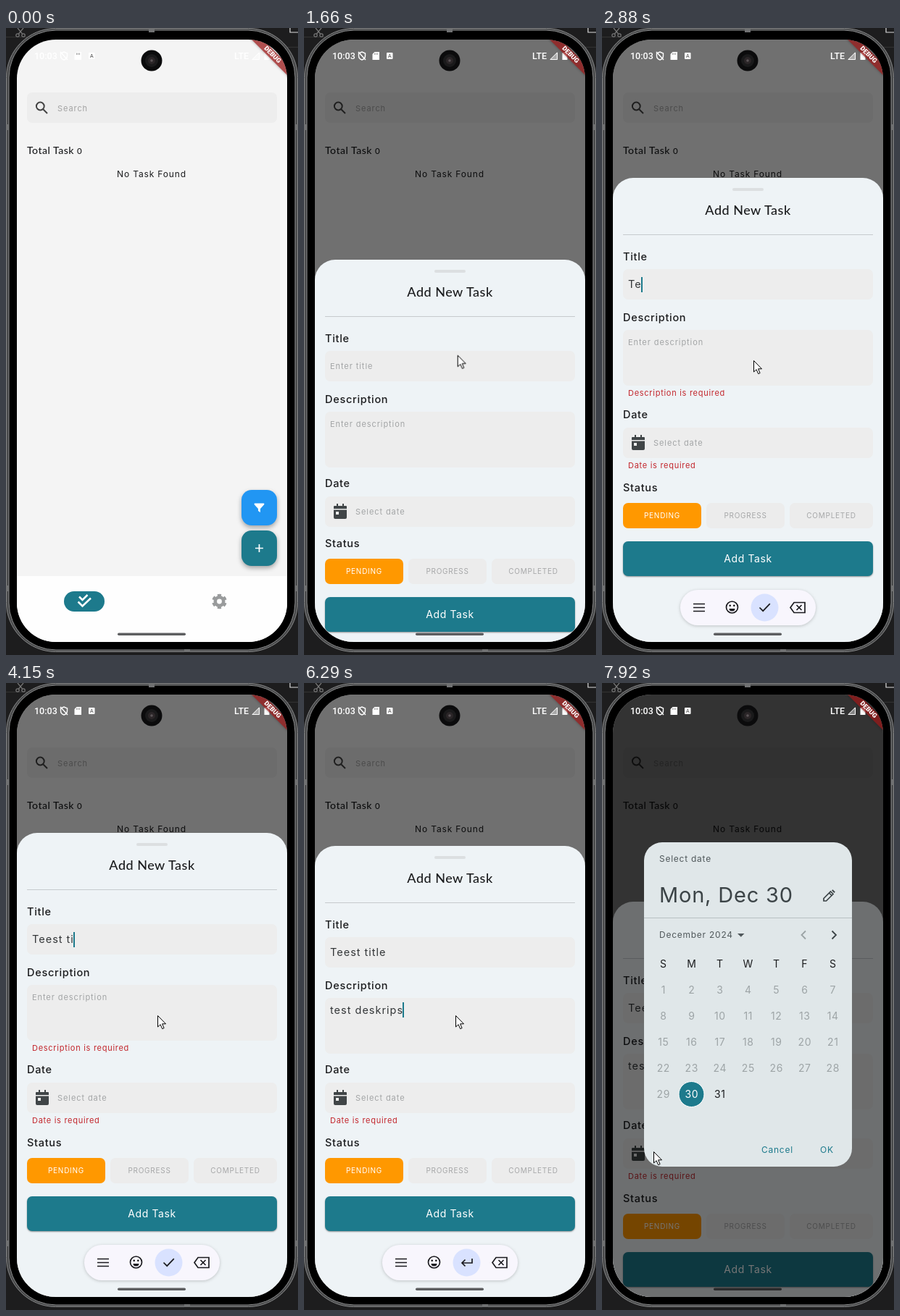
Recreate the animation shown at these times as an HTML page. Size 403 by 866 pixels, loop 7.99 s.

```html
<!DOCTYPE html>
<html lang="en">
<head>
<meta charset="utf-8">
<title>Add a task</title>
<style>
  :root { --teal: #1d7a8c; --loop: 7990ms infinite step-end; }
  html, body { margin: 0; width: 100%; height: 100%; overflow: hidden; background: #1d1d1e; }
  body { font-family: Inter, "Noto Sans", sans-serif; color: #1b1c1e; }
  .stage { position: absolute; left: 0; top: 0; width: 403px; height: 866px; overflow: hidden; }
  .layer { position: absolute; inset: 0; width: 403px; height: 866px; }
  .screen { clip-path: inset(16px 15px 18px 15px round 54px); background: #f4f4f4; }
  p, h1 { margin: 0; font-weight: 400; }
  .hint, .hintfill { font-size: 11px; letter-spacing: .92px; }
  .hint { color: #a3a5a6; }
  .hintfill { fill: #a3a3a3; }
  .head { font-family: Lato, "Open Sans", sans-serif; font-weight: 500; }
  .system { font-family: Roboto, sans-serif; }
  .line { fill: none; stroke: #1b1b1f; stroke-width: 1.7; }

  .scrim { background: #000; opacity: 0; animation: dim var(--loop); }
  .scrim.top { animation-name: dimTop; }
  @keyframes dim {
    0% { opacity: 0 } 11.13% { opacity: .26 } 12.01% { opacity: .44 }
    12.89% { opacity: .52 } 13.76%, 100% { opacity: .54 }
  }
  @keyframes dimTop { 0% { opacity: 0 } 98.24% { opacity: .3 } 99.12%, 100% { opacity: .54 } }

  .sheet {
    position: absolute; left: 15px; bottom: -59px; width: 373px; box-sizing: border-box;
    padding: 0 14px 91px; border-radius: 28px 28px 0 0; background: #eef3f6;
    display: flex; flex-direction: column; translate: 0 620px; animation: sheet var(--loop);
  }
  @keyframes sheet {
    0% { translate: 0 620px } 11.13% { translate: 0 240px } 12.01% { translate: 0 72px }
    12.89% { translate: 0 14px } 13.76% { translate: 0 0 }
    25.03% { translate: 0 -3px } 25.9% { translate: 0 -10px } 26.65% { translate: 0 -24px }
    27.53% { translate: 0 -42px } 28.28% { translate: 0 -57px } 29.16% { translate: 0 -70px }
    30.03% { translate: 0 -77px } 81.22% { translate: 0 -52px } 82.1% { translate: 0 -14px }
    82.97%, 100% { translate: 0 0 }
  }
  .top-bar { height: 78px; border-bottom: 1px solid #c6cacd; position: relative; text-align: center; }
  .top-bar::before {
    content: ""; position: absolute; left: 151px; top: 14px; width: 43px; height: 4px;
    border-radius: 2px; background: #dcdfe1;
  }
  .top-bar h1 { font-size: 18px; letter-spacing: .5px; line-height: 24px; padding-top: 32px; font-weight: 500; }
  .label { font-size: 14.5px; font-weight: 500; letter-spacing: .7px; line-height: 22px; }
  .field {
    position: relative; height: 42px; box-sizing: border-box; padding: 0 7px; border-radius: 7px;
    background: #ededed; display: flex; align-items: center; line-height: 22px;
  }
  .field.area { height: 77px; align-items: flex-start; padding-top: 6px; }
  .field .hint { position: absolute; }
  .value { font-size: 14.5px; letter-spacing: 1px; white-space: pre; color: #333638; }
  .caret { width: 2px; height: 21px; margin-left: -1px; background: var(--teal); }
  .error { height: 18px; line-height: 20px; padding-left: 7px; font-size: 11px; letter-spacing: .72px; color: #c3272d; }
  .chips { display: grid; grid-template-columns: 108px 108px 1fr; gap: 7px; text-align: center; }
  .chips span {
    height: 35px; line-height: 35px; border-radius: 7px; background: #ececec; color: #a6a7a8;
    font-size: 10px; letter-spacing: .75px;
  }
  .chips .on { background: #ff9800; color: #fff; }
  .add {
    margin-top: 18px; height: 48px; line-height: 48px; border-radius: 7px; background: var(--teal);
    color: #fff; text-align: center; font-size: 14px; letter-spacing: .6px; box-shadow: 0 1px 2px #0006;
  }

  .keys { translate: 0 100px; animation: keys var(--loop); filter: drop-shadow(0 1px 2px #0003); }
  .keys g { animation: fadeKeys var(--loop); }
  @keyframes keys {
    0% { translate: 0 100px } 25.9% { translate: 0 60px } 26.65% { translate: 0 24px }
    27.53% { translate: 0 5px } 28.28% { translate: 0 -2px } 29.16% { translate: 0 -1px }
    30.03% { translate: 0 0 } 81.22% { translate: 0 30px } 82.1% { translate: 0 70px }
    82.97%, 100% { translate: 0 100px }
  }
  @keyframes fadeKeys { 0% { opacity: 1 } 80.35%, 100% { opacity: .3 } }

  .dialog { opacity: 0; animation: dialog var(--loop); font-size: 12px; letter-spacing: .75px; }
  @keyframes dialog { 0% { opacity: 0 } 98.24% { opacity: .45 } 99.12%, 100% { opacity: 1 } }
  .days { font-size: 14px; letter-spacing: .6px; text-anchor: middle; }

  .banner {
    position: absolute; left: 352px; top: 10px; width: 73px; height: 11px; transform-origin: 36px 6px;
    transform: translate(-21px, 21px) rotate(45deg); text-align: center; color: #fff;
    font-size: 9px; font-weight: 800; line-height: 11px;
    background: linear-gradient(#b71c1ca0 0 0), #0005; box-shadow: 0 0 4px #0005;
  }

  .mouse { position: absolute; left: 0; top: 0; width: 14px; height: 22px; overflow: visible; opacity: 0; animation: mouse var(--loop); }
  @keyframes mouse {
    0% { opacity: 0; translate: 369px 834px }
    1.62% { opacity: 1; translate: 369px 834px; animation-timing-function: steps(4, start) }
    5.13% { opacity: 1; translate: 346px 755px }
    6.75% { opacity: 1; translate: 346px 755px; animation-timing-function: steps(2, start) }
    8.51% { opacity: 1; translate: 352px 721px }
    12.89% { opacity: 1; translate: 352px 721px; animation-timing-function: steps(5, start) }
    17.27% { opacity: 1; translate: 241px 522px; animation-timing-function: steps(4, start) }
    20.77% { opacity: 1; translate: 213px 448px; animation-timing-function: steps(3, start) }
    23.4% { opacity: 1; translate: 209px 459px }
    88.73% { opacity: 1; translate: 209px 459px; animation-timing-function: steps(6, start) }
    93.99% { opacity: 1; translate: 50px 632px; animation-timing-function: steps(3, start) }
    96.62%, 100% { opacity: 1; translate: 71px 647px }
  }
  [hidden] { display: none !important; }
</style>
</head>
<body>
<div class="stage">
  <!-- phone body -->
  <svg class="layer" viewBox="0 0 403 866">
    <path d="M0 12.500h30M373 26.500h30" stroke="#333"/>
    <g fill="none" stroke="#777" stroke-width="1.200">
      <circle cx="16" cy="10" r="2.200"/><circle cx="24" cy="10" r="2.200"/>
      <path d="M17.500 8L24 0M22.500 8L16 0"/>
      <path d="M392 0v6h11" stroke="#ddd"/>
    </g>
    <rect x=".500" y=".500" width="402" height="861" rx="68" fill="#48494a" stroke="#858687"/>
    <rect x="4" y="3" width="395" height="856" rx="65" fill="#000" stroke="#8a8b8c"/>
    <path d="M0 133h4v8H0zM399 133h4v8h-4zM0 770h4v8H0zM399 770h4v8h-4zM197 0h8v6h-8zM246 858h8v4h-8z" fill="#707172"/>
  </svg>

  <div class="layer screen">
    <!-- task list -->
    <svg class="layer" viewBox="0 0 403 866" fill="#1b1c1e">
      <rect x="29" y="89" width="345" height="42" rx="7" fill="#ededed"/>
      <g fill="none" stroke="#444" stroke-width="2"><circle cx="47.300" cy="108" r="5.400"/><path d="M51 112l6 6"/></g>
      <text class="hintfill" x="71" y="115">Search</text>
      <text class="head" x="29" y="174" font-size="14" letter-spacing=".5">Total Task <tspan font-size="11.500">0</tspan></text>
      <text x="153" y="205.500" font-size="12" letter-spacing=".850">No Task Found</text>
      <rect x="15" y="757" width="373" height="92" fill="#fefefe"/>
      <g style="filter:drop-shadow(0 3px 3px #0005)">
        <rect x="325" y="638" width="49" height="49" rx="14" fill="#2196f3"/>
        <rect x="325" y="694" width="49" height="49" rx="14" fill="#1d7a8c"/>
      </g>
      <path d="M343 656.500h13q1 1 0 2l-5 5.500v5l-3-2v-3l-5-5.500q-1-1 0-2z" fill="#fff"/>
      <path d="M349.500 713v11M344 718.500h11" stroke="#fff" stroke-width="1.700"/>
      <rect x="80" y="778" width="56" height="28" rx="14" fill="#1d7a8c"/>
      <path d="M99.500 792.500l6 6 11.500-11M101 785.500l4.500 4.500 7-7" fill="none" stroke="#fff" stroke-width="2.500"/>
      <g fill="none" stroke="#999b9c">
        <circle cx="294.500" cy="792" r="5.700" stroke-width="4.600"/>
        <circle cx="294.500" cy="792" r="8.500" stroke-width="3.600" stroke-dasharray="4.900 4" transform="rotate(-107 294.500 792)"/>
      </g>
    </svg>

    <div class="layer scrim"></div>

    <div class="sheet">
      <div class="top-bar"><h1 class="head">Add New Task</h1></div>
      <p class="label" style="margin:19px 0 6px">Title</p>
      <div class="field">
        <span class="hint" id="titleHint">Enter title</span><span class="value" id="title"></span><i class="caret" id="titleCaret" hidden></i>
      </div>
      <p class="label" style="margin:14px 0 6px">Description</p>
      <div class="field area">
        <span class="hint" id="descHint">Enter description</span><span class="value" id="desc"></span><i class="caret" id="descCaret" hidden></i>
      </div>
      <p class="error" id="descError" hidden>Description is required</p>
      <p class="label" style="margin:11px 0 7px">Date</p>
      <div class="field">
        <svg width="20" height="22" viewBox="0 0 20 22" style="margin-left:4px" fill="#404547" fill-rule="evenodd">
          <path d="M5 0h2v3h6V0h2v3h3q1 0 1 1v3H1V4q0-1 1-1h3zM1 8.500h18V19q0 2-2 2H3q-2 0-2-2zM4 11v4h4v-4z"/>
        </svg>
        <span class="hint" style="left:42px">Select date</span>
      </div>
      <p class="error" id="dateError" hidden>Date is required</p>
      <p class="label" style="margin:12px 0 10px">Status</p>
      <div class="chips"><span class="on">PENDING</span><span>PROGRESS</span><span>COMPLETED</span></div>
      <div class="add">Add Task</div>
    </div>

    <!-- keyboard bar -->
    <svg class="layer keys" viewBox="0 0 403 866">
      <rect x="108" y="776" width="187" height="49" rx="24.500" fill="#f8f6fd"/>
      <g>
        <circle cx="224.500" cy="800.500" r="19" fill="#d9e2ff"/>
        <path class="line" d="M126 795.500h16M126 800.500h16M126 805.500h16"/>
        <circle class="line" cx="179.500" cy="800" r="8"/>
        <path d="M175.500 802h8a4 3.500 0 0 1-8 0z" fill="#1b1b1f"/>
        <circle cx="176.700" cy="797.700" r="1.200"/><circle cx="182.300" cy="797.700" r="1.200"/>
        <path class="line" id="done" d="M217.500 800.500l4.700 4.700 9.600-10"/>
        <path class="line" id="enter" d="M232 795v6h-14M222.500 796.500l-4.500 4.500 4.500 4.500" hidden/>
        <path class="line" d="M260 800.500l5-7h15v14h-15zM268.500 797l7 7M275.500 797l-7 7"/>
      </g>
    </svg>

    <svg class="layer" viewBox="0 0 403 866"><rect x="154" y="835.500" width="94" height="3.500" rx="1.700" fill="#5d5e60"/></svg>

    <div class="layer scrim top"></div>

    <svg class="layer dialog" viewBox="0 0 403 866" fill="#50585b">
      <rect x="58" y="220" width="287" height="448" rx="25" fill="#e0e7e9"/>
      <path d="M58 324.500h287" stroke="#b8c0c2"/>
      <text x="79" y="246.500">Select date</text>
      <text x="79" y="303" font-size="29" letter-spacing=".800" fill="#3c4447">Mon, Dec 30</text>
      <path d="M306 301v-3.500l9.500-9.500 3.500 3.500-9.500 9.500zM313.500 290l3.500 3.500" fill="none" stroke="#3c4447" stroke-width="1.700"/>
      <path d="M317 286.500l1.500-1.300 3.300 3.300-1.300 1.500z" fill="#3c4447"/>
      <text x="79" y="352">December 2024</text>
      <path d="M187 346h9.500l-4.700 4.700z"/>
      <g fill="none" stroke-width="1.800">
        <path d="M281 342.500l-5.500 5.500 5.500 5.500" stroke="#9aa2a4"/>
        <path d="M317.500 342.500l5.500 5.500-5.500 5.500" stroke="#3c4447"/>
      </g>
      <circle cx="123.500" cy="568" r="17.500" fill="#1d7a8c" stroke="#fff"/>
      <g class="days" id="days"></g>
      <g fill="#1d7a8c"><text x="220" y="648.500">Cancel</text><text x="301" y="648.500">OK</text></g>
    </svg>

    <!-- system bar -->
    <svg class="layer system" viewBox="0 0 403 866" fill="#fff">
      <g font-size="12.500" font-weight="500"><text x="39" y="43">10:03</text><text x="315" y="43">LTE</text></g>
      <path d="M75.500 35l4.500-2 4.500 2v3.500q0 4-4.500 5.500-4.500-1.500-4.500-5.500zM75 33l10 11" fill="none" stroke="#fff" stroke-width="1.400"/>
      <path d="M97.500 33h6.500v11h-9.500v-8z"/>
      <path d="M97.500 34.500v2.500M99.500 34.500v2.500M101.500 34.500v2.500" stroke="#0006"/>
      <rect x="114" y="34" width="8.500" height="9" rx="1"/>
      <path d="M116.300 41l2-5 2 5M117 39.500h2.600" fill="none" stroke="#0008" stroke-width=".900"/>
      <path d="M350 33v11h-11z" fill-opacity=".4"/><path d="M340 43.500l9.500-9.500v9.500z" fill="none" stroke="#fff"/>
      <path d="M358.500 33h3v1.200h2V44h-7v-9.800h2z"/>
    </svg>
    <div class="banner system">DEBUG</div>
    <svg class="layer" viewBox="0 0 403 866">
      <circle cx="201" cy="45" r="14.500" fill="#0b0b0c"/>
      <circle cx="201" cy="45" r="9" fill="#1a1a1b"/>
      <circle cx="201" cy="45" r="5" fill="#2b2628"/>
      <circle cx="201" cy="45" r="1.800" fill="#5a5456"/>
    </svg>
  </div>

  <svg class="mouse" viewBox="0 0 14 22">
    <path d="M.500 .500v15.500l3.600-3.300 2.600 5.900 2.400-1-2.500-5.800h4.900z" fill="#fff" stroke="#000"/>
  </svg>
</div>

<script>
  const LOOP = 7990;
  const FOCUS = 1800, NEXT_FIELD = 4620, BLUR = 6420;
  const titleKeys = [2600, 2740, 2940, 3080, 3280, 3750, 3880, 4150, 4220, 4350, 4480];
  const descKeys = [4820, 4890, 5030, 5100, 5160, 5360, 5430, 5630, 5700, 5840, 5970, 6040, 6170, 6300];
  const $ = id => document.getElementById(id);
  const show = (id, on) => $(id).toggleAttribute("hidden", !on);

  function addDay(label, col, row, fill) {
    const text = document.createElementNS("http://www.w3.org/2000/svg", "text");
    text.setAttribute("x", 84.8 + 39 * col);
    text.setAttribute("y", 393 + 36 * row);
    text.setAttribute("fill", fill);
    text.textContent = label;
    $("days").append(text);
  }
  [..."SMTWTFS"].forEach((day, i) => addDay(day, i, 0, "#1b1c1e"));
  for (let d = 1; d <= 31; d++) {
    const fill = d < 30 ? "#9da4a6" : d === 30 ? "#fff" : "#1b1c1e";
    addDay(d, (d - 1) % 7, Math.ceil(d / 7), fill);
  }

  function type(id, text, keys, t) {
    const count = keys.filter(k => k <= t).length;
    $(id).textContent = text.slice(0, count);
    show(id + "Hint", count === 0);
  }

  function render(t) {
    type("title", "Teest title", titleKeys, t);
    type("desc", "test deskripsi", descKeys, t);
    show("titleCaret", t >= FOCUS && t < NEXT_FIELD);
    show("descCaret", t >= NEXT_FIELD && t < BLUR);
    // the first key validates the whole form
    show("descError", t >= titleKeys[0] && t < descKeys[0]);
    show("dateError", t >= titleKeys[0]);
    show("done", t < NEXT_FIELD);
    show("enter", t >= NEXT_FIELD);
  }

  let start;
  function tick(now) {
    start ??= now;
    render((now - start) % LOOP);
    requestAnimationFrame(tick);
  }
  render(0);
  requestAnimationFrame(tick);
</script>
</body>
</html>
```
